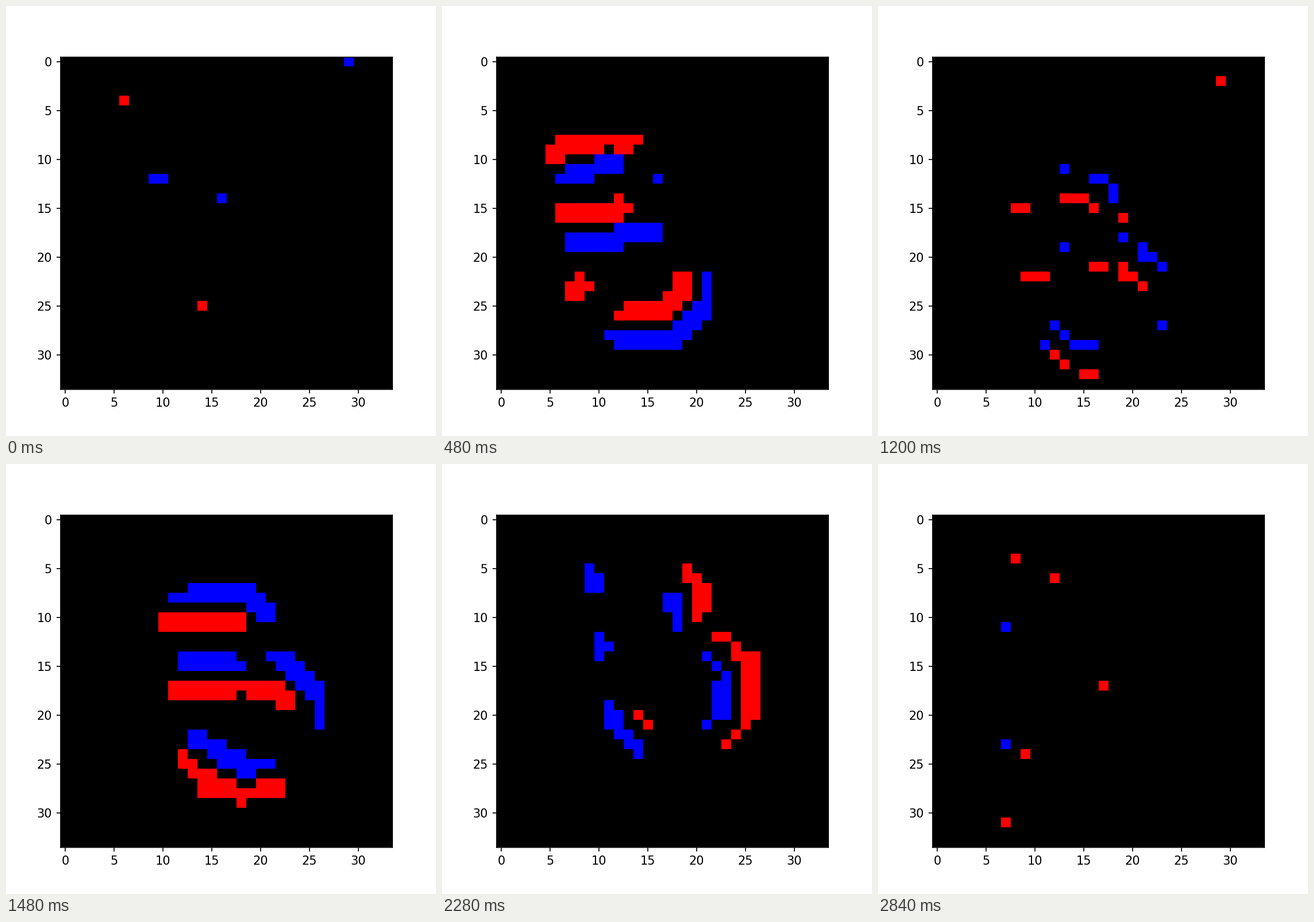
These frames come from a looping animation (748 by 748 pixels, 2880 ms). A matplotlib script:

```python
import numpy as np
import matplotlib.pyplot as plt
from matplotlib.animation import FuncAnimation

SIZE, DPI = 748, 150
N = 34                 # sensor size in cells
SPAN = 24              # frames per saccade
FRAMES = 3 * SPAN
OFF, ON = (255, 0, 0), (0, 0, 255)
STROKE = 1.8           # softness of the pen
THRESHOLD = 0.17       # brightness change that fires an event

# The digit: one long curve and a middle bar.
curve = [(6.5, 10.2), (9.5, 9.4), (13.5, 9.6), (15, 11.5), (15, 14.8), (17, 16.5),
         (20, 19), (20.2, 22), (19.5, 24.5), (17, 26.7), (14, 27.4), (11, 26.7),
         (8.6, 24.3)]
bar = [(7.5, 17), (13, 16.3), (17, 16.5)]

# Saccades run around this triangle; the digit is drawn halfway down the first side.
corners = np.array([(-2.15, -4), (2.15, 4), (6.35, -4), (-2.15, -4)])
rows, cols = np.mgrid[:N, :N]


def distance(a, b, x, y):
    """Distance of every point to the segment from a to b."""
    (ax, ay), (bx, by) = a, b
    ux, uy = bx - ax, by - ay
    t = np.clip(((x - ax) * ux + (y - ay) * uy) / (ux * ux + uy * uy), 0, 1)
    return np.hypot(x - ax - t * ux, y - ay - t * uy)


def brightness(shift):
    x, y = cols - shift[0], rows - shift[1]
    d = np.min([distance(a, b, x, y)
                for path in (curve, bar) for a, b in zip(path, path[1:])], axis=0)
    return np.exp(-(d / STROKE) ** 2)


def progress(phase):
    return np.clip((phase - 3) / 18, 0, 1)


def position(leg, phase):
    u = progress(phase)
    return corners[leg] + (corners[leg + 1] - corners[leg]) * u * u * (3 - 2 * u)


def picture(i):
    leg, phase = divmod(i, SPAN)
    rng = np.random.default_rng(100 + i)
    before = brightness(position(leg, phase - 0.5))
    after = brightness(position(leg, phase + 0.5))
    change = after - before + rng.normal(0, 0.015, (N, N))

    img = np.zeros((N, N, 3), np.uint8)
    img[change > THRESHOLD] = ON
    img[change < -THRESHOLD] = OFF

    # Between saccades only loose events remain, mostly near the digit.
    u = progress(phase)
    lull = 1 - 4 * u * (1 - u)
    loose = rng.random((N, N)) < lull * np.where(after > 0.25, 0.03, 0.0015)
    red = rng.random((N, N)) < 0.55
    img[loose & red] = OFF
    img[loose & ~red] = ON
    return img


fig = plt.figure(figsize=(SIZE / DPI, SIZE / DPI), dpi=DPI)
side = 577.5
ax = fig.add_axes([94.625 / SIZE, 81.5 / SIZE, side / SIZE, side / SIZE])
view = ax.imshow(picture(0), interpolation="nearest")
ax.set_xticks(range(0, N, 5))
ax.set_yticks(range(0, N, 5))


def update(i):
    view.set_data(picture(i))
    return [view]


anim = FuncAnimation(fig, update, frames=FRAMES, interval=40, repeat=True)
plt.show()
```
